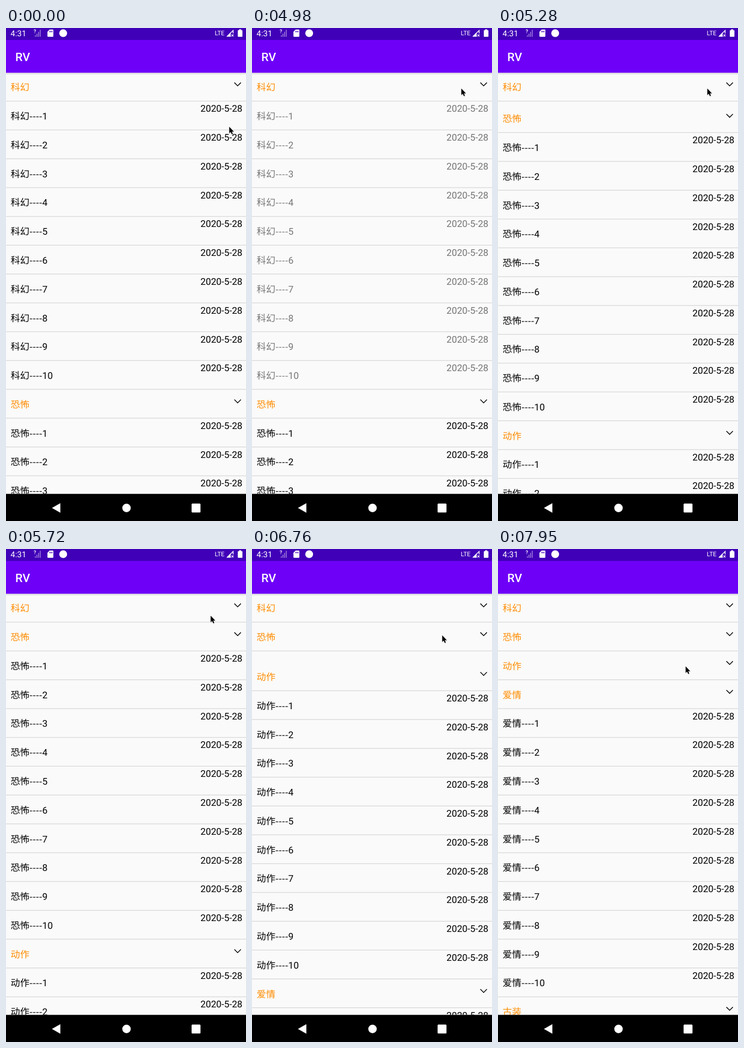
An HTML page for the animation above (8000 ms loop, 465 by 954 pixels).

```html
<!DOCTYPE html>
<html lang="zh-CN">
<head>
<meta charset="utf-8">
<title>RV</title>
<style>
  html, body { margin: 0; width: 100%; height: 100%; overflow: hidden; background: #fafafa; }
  svg { display: block; width: 100%; height: 100%; text-rendering: geometricPrecision; }
  text { font-family: Roboto, "Noto Sans CJK SC", "Noto Sans CJK", sans-serif; white-space: pre; }
  .row { font-size: 18.1px; }
  .cjk { font-family: "Noto Sans CJK SC", "Noto Sans CJK", "Noto Sans CJK JP", sans-serif; }
  .head { fill: #ff8c00; }
  .line { fill: #d6d6d6; }
  .chevron { fill: none; stroke: #000; stroke-width: 1.5; }
</style>
</head>
<body>
<svg viewBox="0 0 465 954">
  <defs>
    <linearGradient id="shade" x1="0" y1="0" x2="0" y2="1">
      <stop offset="0" stop-color="#000" stop-opacity=".14"/>
      <stop offset="1" stop-color="#000" stop-opacity="0"/>
    </linearGradient>
    <clipPath id="view"><rect y="86.4" width="465" height="815.1"/></clipPath>
  </defs>

  <rect width="465" height="954" fill="#fafafa"/>
  <g id="list" clip-path="url(#view)"></g>
  <rect y="86.6" width="465" height="4.4" fill="url(#shade)"/>

  <!-- app bar and status bar -->
  <rect width="465" height="86.6" fill="#6e00f8"/>
  <rect width="465" height="23.2" fill="#4000b8"/>
  <text x="18.1" y="64" font-size="22.6" font-weight="500" fill="#fff">RV</text>
  <g fill="#fff">
    <text x="8.8" y="15.8" font-size="15.8">4:31</text>
    <text x="53.6" y="10.2" font-size="10" font-weight="500">?</text>
    <path d="M56 14h1.6v3H56zM59.2 11h1.6v6h-1.6zM62.4 7.5H64V17h-1.6zM65.6 3.5h1.6V17h-1.6z" opacity=".5"/>
    <path fill-rule="evenodd" d="M84.5 3H90.5Q91.7 3 91.7 4.2V15.8Q91.7 17 90.5 17H81.5Q80.3 17 80.3 15.8V7.2ZM84 5.5V8.2H85.3V5.5ZM86.3 5.5V8.2H87.6V5.5ZM88.6 5.5V8.2H89.9V5.5Z"/>
    <circle cx="110.8" cy="10" r="7.6"/>
    <text x="404.6" y="14.2" font-size="12">LTE</text>
    <path d="M427.2 16.6L440.8 3V10.6H439.3V6.6L430.8 15.1H435.6V16.6Z"/>
    <path d="M427.2 16.6L435.2 8.6V16.6Z"/>
    <path d="M436.8 12.4l4 4m0-4l-4 4" stroke="#fff" stroke-width="1.2"/>
    <path d="M451.6 2.6h4v1.6h1.5q1 0 1 1v10.9q0 1-1 1h-7q-1 0-1-1V5.2q0-1 1-1h1.5z"/>
  </g>

  <!-- navigation bar -->
  <rect y="901.5" width="465" height="52.5"/>
  <g fill="#fff">
    <path d="M89 928.8L105.3 919.5V938.1Z"/>
    <circle cx="233.5" cy="928.8" r="8.2"/>
    <rect x="359.6" y="920.2" width="17.2" height="17.4" rx="1.5"/>
  </g>

  <g id="cursor">
    <path d="M2 3V15.5L5 13 7 17.3 9.2 16.4 7.2 12H11.2Z" opacity=".18"/>
    <path d="M1.5 1V13.8L4.4 11.2 6.4 15.8 8.6 14.9 6.6 10.4H10.5Z" stroke="#fff" stroke-width="1.4" paint-order="stroke"/>
  </g>
</svg>
<script>
const LOOP = 8000, TOP = 86.4, PITCH = 55.77, ITEMS = 10;
const SECTIONS = ['科幻', '恐怖', '动作', '爱情', '古装'];

// The screen is refreshed in steps, so motion is sampled at this rate.
const STEP = 148.9, STEP_OFFSET = 495;

// Each section folds in turn: its items fade out, then the rest slides up.
const FOLDS = [4935, 6440, 7562];
const FADE = 56, SLIDE_DELAY = 90, SLIDE = 250;

const HOME = { x: 431, y: 190 };
const MOVES = [
  { at: 420, time: 820, x: 404, y: 116 },
  { at: 5674, time: 200, x: 367, y: 166 },
  { at: 6899, time: 200, x: 362, y: 226 }
];

const list = document.getElementById('list');
const cursor = document.getElementById('cursor');

const progress = (t, from, time) => Math.min(1, Math.max(0, (t - from) / time));
const easeInOut = u => (1 - Math.cos(Math.PI * u)) / 2;
const easeOut = u => 1 - (1 - u) ** 1.6;

function add(parent, tag, attrs, text = '') {
  const el = document.createElementNS('http://www.w3.org/2000/svg', tag);
  for (const key in attrs) el.setAttribute(key, attrs[key]);
  el.textContent = text;
  return parent.appendChild(el);
}

function makeRow(section, item) {
  const el = add(list, 'g', { class: 'row' });
  add(el, 'rect', { class: 'line', y: PITCH - 1.29, width: 465, height: 1.29 });
  const body = add(el, 'g', {});
  const label = add(body, 'text', { x: 9.05, y: 35 });
  if (item) {
    add(label, 'tspan', { class: 'cjk' }, SECTIONS[section] + '----');
    add(label, 'tspan', {}, item);
    add(body, 'text', { x: 458, y: 20.2, 'text-anchor': 'end' }, '2020-5-28');
  } else {
    add(label, 'tspan', { class: 'cjk head' }, SECTIONS[section]);
    add(body, 'path', { class: 'chevron', d: 'M442.5 19.2L448.8 25.6 455.1 19.2' });
  }
  return { el, body, section, item };
}

const rows = SECTIONS.flatMap((_, s) =>
  Array.from({ length: ITEMS + 1 }, (_, i) => makeRow(s, i)));

function drawList(t) {
  let y = TOP;
  for (const { el, body, section, item } of rows) {
    const fold = FOLDS[section] ?? Infinity;
    const shown = !item || t < fold + SLIDE_DELAY;
    el.style.display = shown ? '' : 'none';
    if (shown) {
      el.setAttribute('transform', `translate(0 ${y})`);
      body.setAttribute('opacity', item ? 1 - easeInOut(progress(t, fold, FADE)) : 1);
      y += PITCH;
    } else {
      y += PITCH * (1 - easeInOut(progress(t, fold + SLIDE_DELAY, SLIDE)));
    }
  }
}

function drawCursor(t) {
  let { x, y } = HOME;
  for (const move of MOVES) {
    const p = easeOut(progress(t, move.at, move.time));
    x += (move.x - x) * p;
    y += (move.y - y) * p;
  }
  cursor.setAttribute('transform', `translate(${Math.round(x)} ${Math.round(y)})`);
}

function draw(t) {
  const sampled = STEP_OFFSET + Math.floor((t - STEP_OFFSET) / STEP) * STEP;
  drawList(sampled);
  drawCursor(sampled);
}

const start = performance.now();
function tick() {
  draw((performance.now() - start) % LOOP);
  requestAnimationFrame(tick);
}
tick();
</script>
</body>
</html>
```
